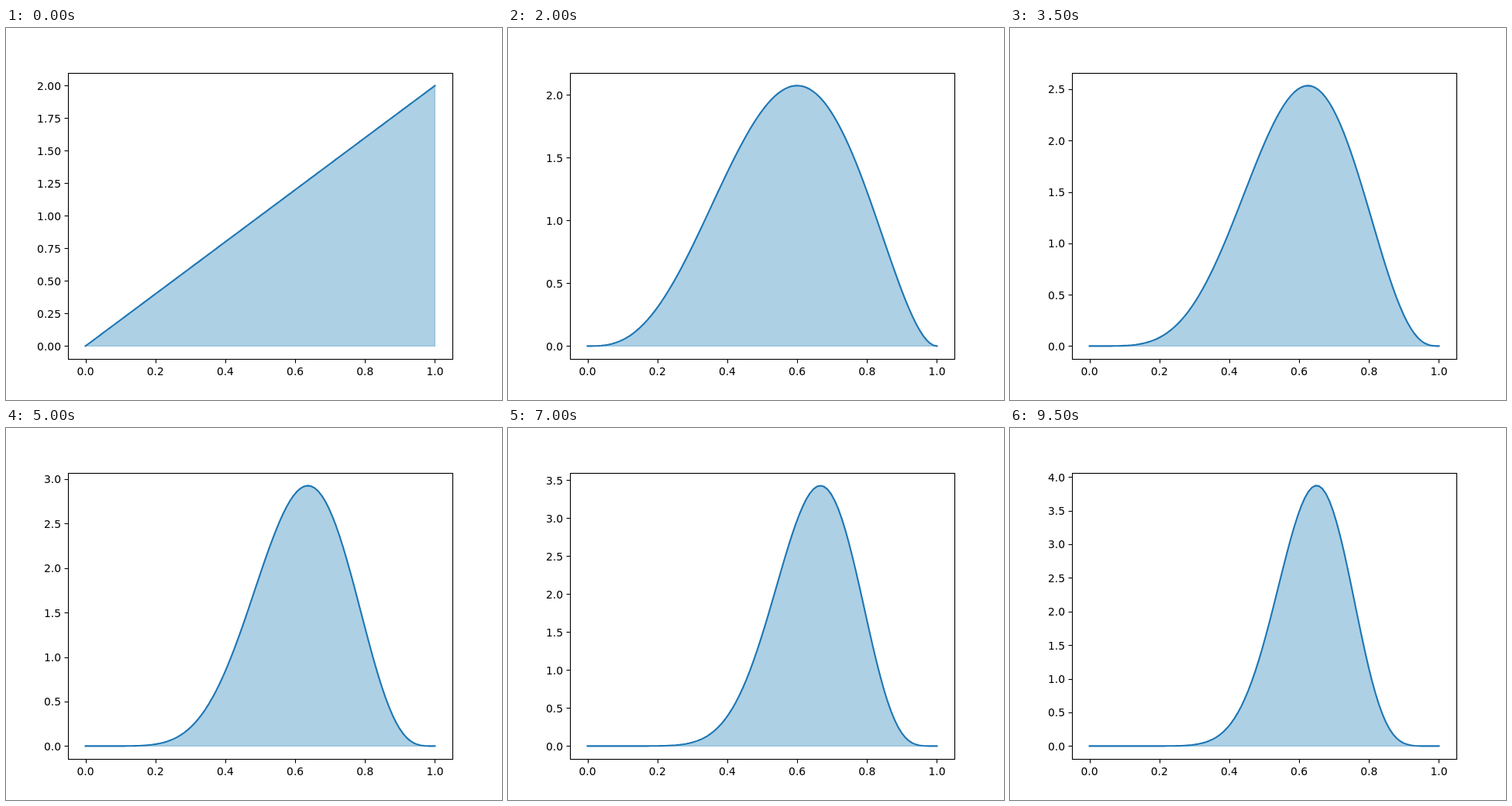
An HTML page with a canvas for the animation above (10000 ms loop, 640 by 480 pixels).

```html
<!DOCTYPE html>
<html lang="en">
<head>
<meta charset="utf-8">
<title>Coin flip posterior</title>
<style>
html, body { margin: 0; width: 100%; height: 100%; overflow: hidden; background: #fff; }
canvas { display: block; }
</style>
</head>
<body>
<canvas id="plot" width="640" height="480"></canvas>
<script>
const ctx = document.getElementById('plot').getContext('2d');
const FLIPS = 'HTTHHHHTHHTHTHHHHTTH';
const STEP_MS = 500, SAMPLES = 100;
const PT = 100 / 72;                       // pixels per point
const X0 = 80 + 496 / 22, WIDTH = 496 / 1.1;
const Y0 = 410.4, HEIGHT = 336;
const snap = v => Math.floor(v + 0.5) + 0.5;

// Beta density after the given heads and tails, from a uniform prior
function density(heads, tails) {
  let scale = heads + tails + 1;
  for (let i = 1; i <= tails; i++) scale *= (heads + i) / i;
  return x => scale * x ** heads * (1 - x) ** tails;
}

function line(x1, y1, x2, y2) {
  ctx.beginPath();
  ctx.moveTo(x1, y1);
  ctx.lineTo(x2, y2);
  ctx.stroke();
}

function drawCurve(values, max) {
  const curve = new Path2D();
  values.forEach((v, i) =>
    curve.lineTo(X0 + WIDTH * i / (SAMPLES - 1), Y0 - HEIGHT * v / max));
  const area = new Path2D(curve);
  area.lineTo(X0 + WIDTH, Y0);
  area.lineTo(X0, Y0);
  area.closePath();

  ctx.lineJoin = 'round';
  ctx.globalAlpha = 0.4;
  ctx.fillStyle = ctx.strokeStyle = '#348abd';
  ctx.lineWidth = PT;
  ctx.fill(area);
  ctx.stroke(area);

  ctx.globalAlpha = 1;
  ctx.strokeStyle = '#1f77b4';
  ctx.lineWidth = 1.5 * PT;
  ctx.lineCap = 'square';
  ctx.stroke(curve);
}

function drawAxes(max) {
  ctx.lineCap = 'butt';
  ctx.lineJoin = 'miter';
  ctx.lineWidth = 0.8 * PT;
  ctx.strokeStyle = ctx.fillStyle = '#000';
  ctx.font = `${10 * PT}px "DejaVu Sans", sans-serif`;
  ctx.strokeRect(80.5, 58.5, 496, 369);

  ctx.textAlign = 'center';
  for (let i = 0; i <= 5; i++) {
    const x = X0 + WIDTH * i / 5;
    line(snap(x), 427.5, snap(x), 432.5);
    ctx.fillText((i / 5).toFixed(1), x, 448);
  }

  ctx.textAlign = 'right';
  const step = [0.2, 0.25, 0.5].find(s => s >= max * 1.1 / 9);
  for (let i = 0; i * step <= max * 1.05; i++) {
    const y = Y0 - HEIGHT * i * step / max;
    line(80.5, snap(y), 75.5, snap(y));
    ctx.fillText((i * step).toFixed(step === 0.25 ? 2 : 1), 71, Math.ceil(y + 5));
  }
}

function draw(time) {
  const count = Math.floor(time / STEP_MS) % FLIPS.length + 1;
  const heads = FLIPS.slice(0, count).replaceAll('T', '').length;
  const f = density(heads, count - heads);
  const values = Array.from({ length: SAMPLES }, (_, i) => f(i / (SAMPLES - 1)));
  const max = Math.max(...values);

  ctx.fillStyle = '#fff';
  ctx.fillRect(0, 0, 640, 480);
  drawCurve(values, max);
  drawAxes(max);
  requestAnimationFrame(draw);
}
requestAnimationFrame(draw);
</script>
</body>
</html>
```
